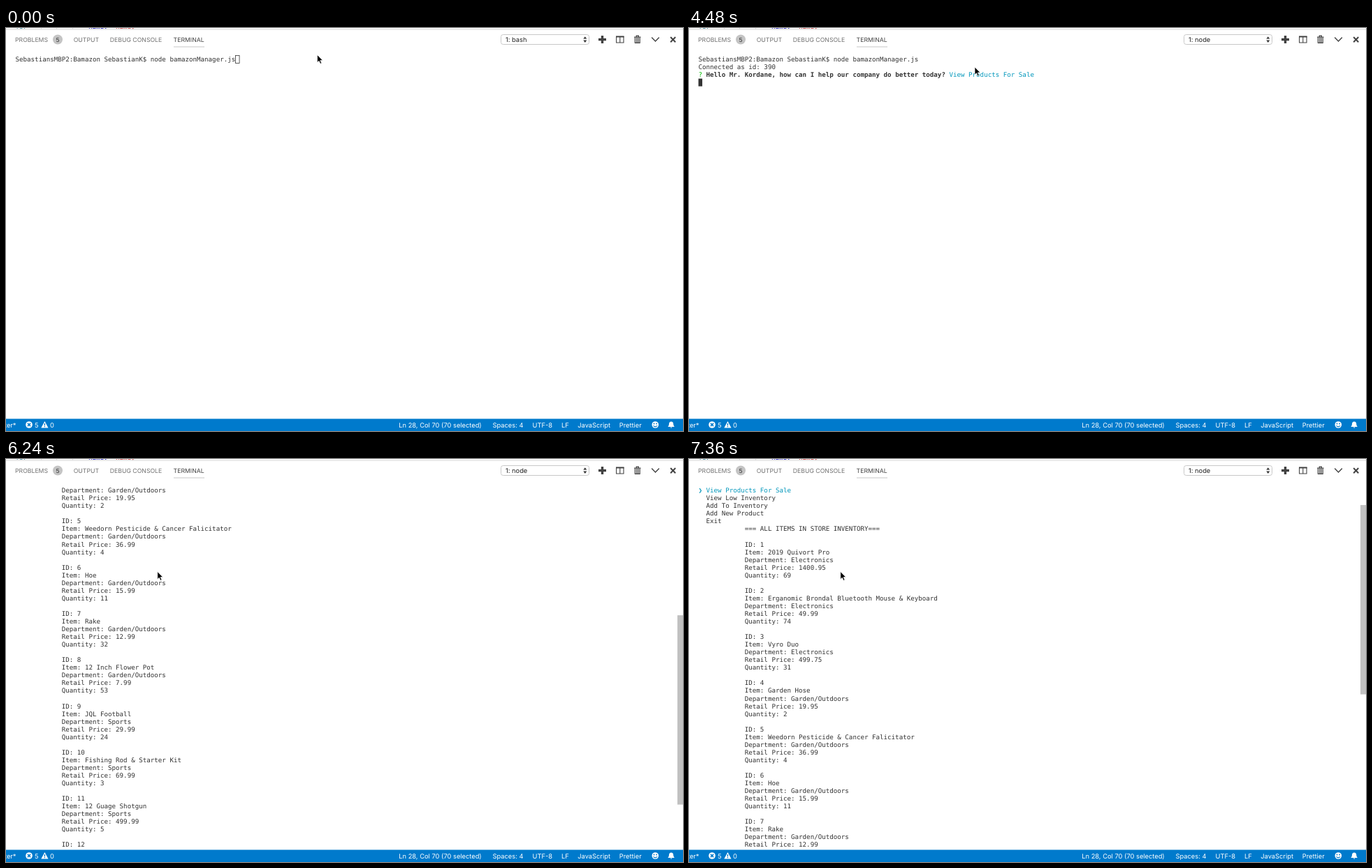
These frames come from a looping animation (969x578 px, 8000 ms). An HTML page:

```html
<!DOCTYPE html>
<html lang="en">
<head>
<meta charset="utf-8">
<title>Terminal session</title>
<style>
html, body { margin: 0; width: 100%; height: 100%; overflow: hidden; background: #fff; }
svg { display: block; }
text { white-space: pre; text-rendering: geometricPrecision; font-family: Inter, Roboto, sans-serif; }
.mono text { font: 9.18px "DejaVu Sans Mono", monospace; fill: #333; }
.mono .bold { font-weight: bold; }
.mono .green { fill: #00bc00; }
.mono .cyan { fill: #0598bc; }
.mono .dim { opacity: .5; fill: #999; }
.tabs { font-size: 8.7px; fill: #717171; }
.status { font-size: 9.3px; fill: #fff; }
</style>
</head>
<body>
<svg width="969" height="578" viewBox="0 0 969 578">
  <defs><clipPath id="strip"><rect width="969" height="1.6"/></clipPath></defs>

  <!-- editor edge -->
  <g class="mono" clip-path="url(#strip)">
    <text x="13.5" y="1.4" style="fill:#267f99">for</text>
    <path d="M50.5 0v2M72.5 0v2M95.5 0v2" stroke="#ddd"/>
    <text x="118" y="1.4" style="fill:#0000c0">name:</text>
    <text x="157" y="1.4" style="fill:#c81e1e">name,</text>
  </g>
  <path d="M0 2H969" stroke="#d6d6d6"/>

  <!-- panel header -->
  <g class="tabs">
    <text x="13" y="19.8">PROBLEMS</text>
    <circle cx="74" cy="16.5" r="7" fill="#c4c4c4"/>
    <text x="74" y="19.5" text-anchor="middle" font-size="8.4" fill="#333">5</text>
    <text x="96.7" y="19.8">OUTPUT</text>
    <text x="148.8" y="19.8">DEBUG CONSOLE</text>
    <text x="239.6" y="19.8" fill="#424242">TERMINAL</text>
  </g>
  <path d="M240 27H284" stroke="#c6c6c6"/>
  <rect x="708.5" y="9.5" width="126" height="14" rx="3" fill="#fff" stroke="#c8c8c8"/>
  <text id="shell" x="715" y="20" font-size="9.3" fill="#222"></text>
  <path d="M826.3 15.6l2.5-3.4 2.5 3.4zM826.3 17.6l2.5 3.4 2.5-3.4z" fill="#333"/>
  <g fill="none" stroke="#424242">
    <path d="M848 16.5h11M853.5 11v11" stroke-width="3.4"/>
    <path d="M873.6 12v9h10.4v-9M878.8 12v9" stroke-width="1.1"/>
    <path d="M873 12.4h11.6" stroke-width="2"/>
    <path d="M899 13.2h9.6M902.2 12.6v-1.4h3.2v1.4" stroke-width="1.2"/>
    <path d="M900.4 14v7.4h6.8V14M902.7 14v7M904.9 14v7" stroke-width="1.2"/>
    <path d="M924.2 13.6l5.3 5.4 5.3-5.4" stroke-width="1.4"/>
    <path d="M951.2 13l7 7.2M958.2 13l-7 7.2" stroke-width="2"/>
  </g>

  <!-- terminal -->
  <g id="screen" class="mono"></g>
  <rect id="caret" width="5.53" height="11"/>
  <rect id="thumb" x="961" width="8" height="271.5" fill="#c1c1c1"/>

  <!-- status bar -->
  <rect y="560.5" width="969" height="17.5" fill="#007acc"/>
  <g class="status">
    <text x="14.5" y="572.6" text-anchor="end">master*</text>
    <circle cx="33" cy="569" r="4.8"/>
    <path d="M30.9 566.9l4.2 4.2M35.1 566.9l-4.2 4.2" stroke="#007acc" stroke-width="1.5"/>
    <text x="41" y="572.6">5</text>
    <path d="M55.4 564l5.1 9.4H50.3z"/>
    <path d="M55.4 567v3.2M55.4 571v1.3" stroke="#007acc" stroke-width="1.3"/>
    <text x="63" y="572.6">0</text>
    <text x="562.3" y="572.6">Ln 28, Col 70 (70 selected)</text>
    <text x="696.6" y="572.6">Spaces: 4</text>
    <text x="753.6" y="572.6">UTF-8</text>
    <text x="795" y="572.6">LF</text>
    <text x="818.3" y="572.6">JavaScript</text>
    <text x="877.8" y="572.6">Prettier</text>
    <circle cx="929.3" cy="569" r="4.8"/>
    <circle cx="927.5" cy="567.5" r=".9" fill="#007acc"/>
    <circle cx="931.1" cy="567.5" r=".9" fill="#007acc"/>
    <path d="M926.5 570.3q2.8 3.2 5.6 0" fill="none" stroke="#007acc" stroke-width="1.1"/>
    <path d="M947.4 572q1.6-1.6 1.6-4 0-3.6 3.1-3.6t3.1 3.6q0 2.4 1.6 4zM950.8 572.6h2.6l-1.3 1.4z"/>
  </g>

  <path id="pointer" d="M0 0V11l2.5-2.3 1.8 4.1 1.9-.8-1.8-4H7.8z" stroke="#fff" stroke-width=".7"/>
</svg>
<script>
const LOOP = 8000, LEFT = 13.5, TOP = 39.45, CHAR = 5.527, LINE = 11.05, ROWS = 47;
const $ = id => document.getElementById(id);
const span = (style, s) => `<tspan class="${style}">${s}</tspan>`;

const command = 'SebastiansMBP2:Bamazon SebastianK$ node bamazonManager.js';
const greeting = span('green', '?') +
  span('bold', ' Hello Mr. Kordane, how can I help our company do better today? ');
const choice = 'View Products For Sale';
const menu = [span('cyan', '❯ ' + choice),
  '  View Low Inventory', '  Add To Inventory', '  Add New Product', '  Exit'];
const intro = [command, 'Connected as id: 390'];
const asking = [...intro, greeting + span('dim', '(Use arrow keys)'), ...menu];
const answered = [...intro, greeting + span('cyan', choice)];

const tech = 'Electronics', garden = 'Garden/Outdoors', sports = 'Sports';
const items = [
  ['2019 Quivort Pro', tech, '1400.95', 69],
  ['Erganomic Brondal Bluetooth Mouse &amp; Keyboard', tech, '49.99', 74],
  ['Vyro Duo', tech, '499.75', 31],
  ['Garden Hose', garden, '19.95', 2],
  ['Weedorn Pesticide &amp; Cancer Falicitator', garden, '36.99', 4],
  ['Hoe', garden, '15.99', 11],
  ['Rake', garden, '12.99', 32],
  ['12 Inch Flower Pot', garden, '7.99', 53],
  ['JQL Football', sports, '29.99', 24],
  ['Fishing Rod &amp; Starter Kit', sports, '69.99', 3],
  ['12 Guage Shotgun', sports, '499.99', 5],
  ['Lacrosse Helmet', sports, '99.99', 4],
  ['Frozen Pizza', 'Groceries', '14.99', 55]
];
const listing = ['=== ALL ITEMS IN STORE INVENTORY===', '',
  ...items.flatMap(([name, dept, price, count], i) => [`ID: ${i + 1}`, `Item: ${name}`,
    `Department: ${dept}`, `Retail Price: ${price}`, `Quantity: ${count}`, ''])];
const inventory = [...menu, ...listing.map(s => s && ' '.repeat(12) + s)];

// Each step changes part of the state; scroll is in lines from the menu.
const steps = [
  [0, { x: 445.5, y: 38.5, shell: 'bash', lines: [command], caret: [57, 0], focus: false, scroll: null }],
  [160, { x: 409, y: 57 }],
  [320, { y: 56, focus: true }],
  [1920, { caret: [0, 1] }],
  [2080, { shell: 'node' }],
  [2720, { lines: asking, caret: null }],
  [4480, { lines: answered, caret: [0, 3] }],
  [4640, { lines: inventory, caret: null, scroll: 38 }],
  [5440, { x: 306.5, y: 24.5 }],
  [5600, { x: 242.5, y: 81.5 }],
  [5760, { x: 216.8, y: 161.5 }],
  [6080, { scroll: 34 }],
  [6240, { scroll: 27 }],
  [6400, { scroll: 22 }],
  [6560, { scroll: 16 }],
  [6720, { scroll: 14 }],
  [7040, { scroll: 8 }],
  [7200, { scroll: 2 }],
  [7360, { scroll: -.4 }]
];

function set(el, attrs) {
  for (const key in attrs) el.setAttribute(key, attrs[key]);
}

function draw(s) {
  const first = Math.max(0, Math.round(s.scroll || 0));
  $('screen').innerHTML = s.lines.slice(first, first + ROWS).map((line, i) =>
    `<text x="${LEFT}" y="${TOP + 8.7 + i * LINE}">${line}</text>`).join('');
  $('shell').textContent = '1: ' + s.shell;
  set($('pointer'), { transform: `translate(${s.x} ${s.y})` });

  $('caret').style.display = s.caret ? '' : 'none';
  if (s.caret) {
    const [col, row] = s.caret;
    set($('caret'), { x: LEFT + col * CHAR, y: TOP + row * LINE,
      fill: s.focus ? '#333' : 'none', stroke: s.focus ? 'none' : '#333', 'stroke-width': .8 });
  }
  $('thumb').style.display = s.scroll === null ? 'none' : '';
  set($('thumb'), { y: 39.5 + 5.77 * (s.scroll + 5) });
}

let shown = 0;
function frame() {
  const t = performance.now() % LOOP;
  const past = steps.filter(([at]) => at <= t);
  if (past.length !== shown) {
    shown = past.length;
    draw(Object.assign({}, ...past.map(([, change]) => change)));
  }
  requestAnimationFrame(frame);
}
frame();
</script>
</body>
</html>
```
